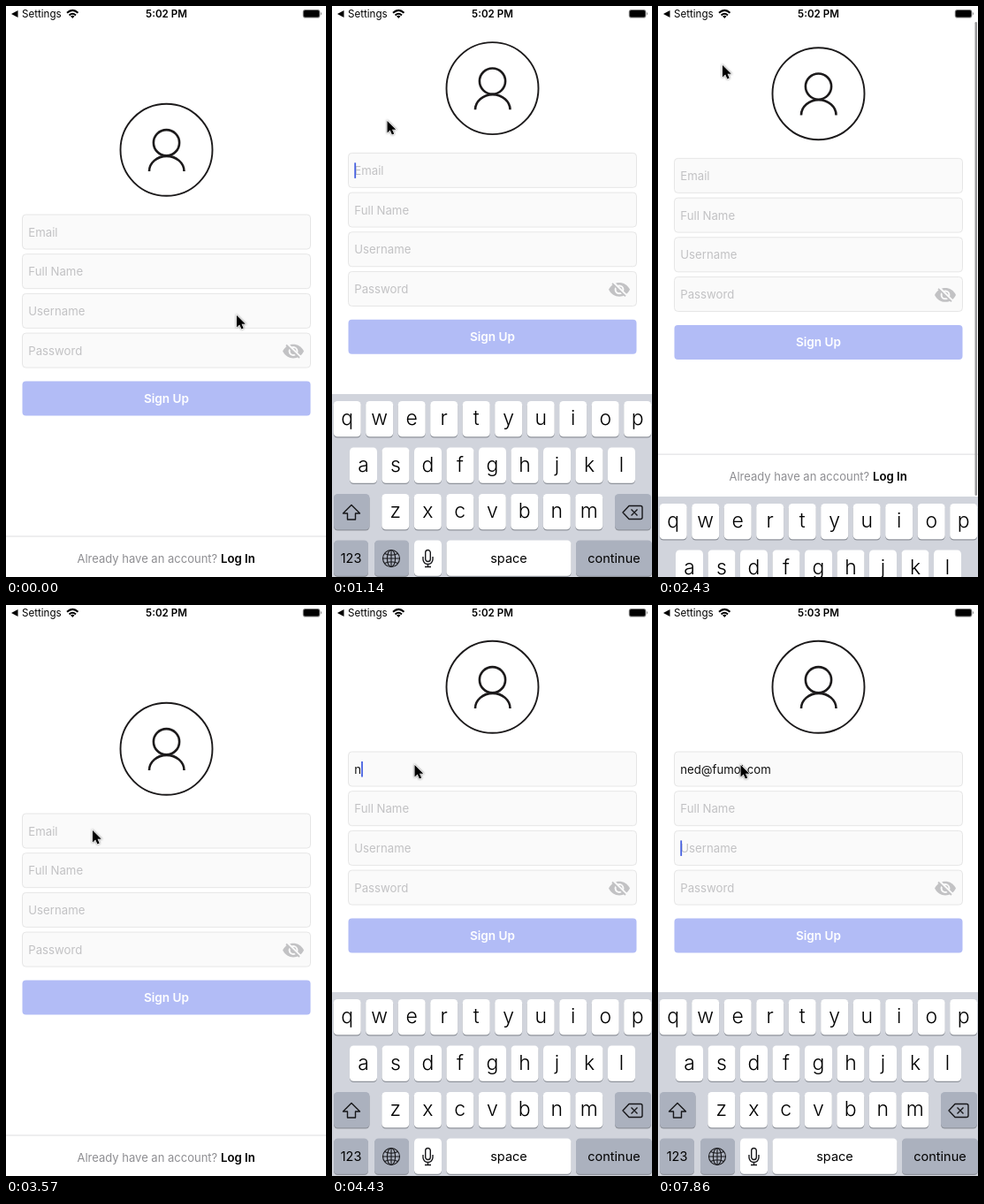
Animation, 362 px wide and 646 px high, one loop 8 s. Source, as an HTML page:

```html
<!DOCTYPE html>
<html lang="en">
<head>
<meta charset="utf-8">
<title>Sign up form</title>
<style>
  html, body { margin: 0; width: 100%; height: 100%; overflow: hidden; background: #fff; }
  svg { display: block; width: 362px; height: 646px; }
  text { font: 13.2px Inter, Roboto, sans-serif; }
  .bold { font-weight: 600; }
  .middle { text-anchor: middle; }
  .field { fill: #fafafa; stroke: #e6e6e6; }
  .hint { fill: #c2c2c4; }
  .line { fill: none; stroke: #17171a; stroke-width: 1.4; stroke-linejoin: round; }
  .letter { font-size: 23px; font-weight: 300; }
  .label { font-size: 14.5px; }
</style>
</head>
<body>
<svg viewBox="0 0 362 646">
  <g id="footer">
    <path d="M0 600H362" stroke="#e8e8ea" stroke-width="1.6"/>
    <text x="80.5" y="630" fill="#8e8e92" style="font-size:13px">Already have an account?</text>
    <text x="243" y="630" class="bold">Log In</text>
  </g>

  <g id="form">
    <g fill="none" stroke="#1c1a1b">
      <circle cx="181.5" cy="162.8" r="52" stroke-width="1.9"/>
      <circle cx="181.5" cy="154.7" r="14.6" stroke-width="2.6"/>
      <path d="M162 187A19.6 17 0 0 1 201.5 187" stroke-width="2.6"/>
    </g>
    <g id="fields"></g>
    <g transform="translate(325 390.5)">
      <path d="M-12 0C-7-10.500 7-10.500 12 0C7 10.500-7 10.500-12 0Z" fill="#c2c2c4"/>
      <circle r="5.4" fill="#fafafa"/>
      <circle r="3.4" fill="#c2c2c4"/>
      <path d="M-6-7.500L8 6.500" stroke="#fafafa" stroke-width="2.5"/>
      <path d="M-8-7L7 7.500" stroke="#c2c2c4" stroke-width="1.8"/>
    </g>
    <rect x="18.5" y="424.5" width="326" height="39" rx="4" fill="#b2bcf6"/>
    <text x="181.5" y="449" class="bold middle" fill="#fff" style="font-size:13.6px">Sign Up</text>
    <rect id="caret" width="1.8" height="17.5" fill="#4660e0"/>
  </g>

  <rect id="scrollbar" x="358.5" y="18" width="2.5" rx="1.2" fill="#969698"/>

  <g id="keyboard">
    <rect y="438" width="362" height="210" fill="#d1d4dc"/>
    <g id="keys"></g>
    <path class="line" d="M22 563.5L31.5 573H26.5V580H17.5V573H12.5Z"/>
    <path class="line" d="M329 572L336 564.5H349Q351 564.5 351 566.5V577.5Q351 579.5 349 579.5H336ZM338.5 568.5L345.5 575.5M345.5 568.5L338.5 575.5"/>
    <g class="line" transform="translate(67 624)" style="stroke-width:1.1">
      <circle r="9.5"/>
      <ellipse rx="4.6" ry="9.5"/>
      <path d="M0-9.5V9.5M-9.5 0H9.5M-7.5-5.5Q0-2 7.5-5.5M-7.5 5.5Q0 2 7.5 5.5"/>
    </g>
    <g class="line" transform="translate(108.5 624)">
      <rect x="-2.8" y="-9.5" width="5.6" height="13" rx="2.8"/>
      <path d="M-5.5-2V1A5.5 5.5 0 0 0 5.5 1V-2M0 6.5V9.5M-3.5 9.5H3.5"/>
    </g>
  </g>

  <g id="status">
    <path d="M6 9L13.5 5V13Z"/>
    <text x="18" y="13.2" style="font-size:11.6px">Settings</text>
    <path d="M69 7.7Q75.3 2 81.5 7.7M71.5 10.4Q75.3 7 79 10.4" fill="none" stroke="#000" stroke-width="2"/>
    <path d="M75.3 14L73 11.5Q75.3 9.8 77.6 11.5Z"/>
    <text id="clock" x="181.5" y="13.2" class="bold middle" style="font-size:11.6px"></text>
    <rect x="335.8" y="4" width="19.5" height="9.6" rx="2.8" fill="#777"/>
    <rect x="336.8" y="5" width="17.5" height="7.6" rx="1.8"/>
    <path d="M356 7Q358 8.7 356 10.5Z" fill="#8a8a8a"/>
  </g>

  <path id="pointer" d="M0 0V13.5L3.2 10.6L5.4 15.6L7.7 14.6L5.5 9.7H9.8Z" stroke="#fff" stroke-width="1.2" paint-order="stroke"
    style="filter:drop-shadow(0 .5px .8px #0008)"/>
</svg>
<script>
const DURATION = 8000;
const $ = id => document.getElementById(id);

const fieldY = i => 236 + i * 44.7;
$('fields').innerHTML = ['Email', 'Full Name', 'Username', 'Password'].map((hint, i) => `
  <rect class="field" x="18.5" y="${fieldY(i)}" width="326" height="39" rx="4"/>
  <text class="hint" x="25.3" y="${fieldY(i) + 24.5}">${hint}</text>`).join('');
const emailText = document.querySelector('.hint');

function key(x, y, width, label = '', kind = 'label', fill = '#fff') {
  const baseline = y + (kind === 'letter' ? 27 : 25);
  return `<rect x="${x}" y="${y + 1}" width="${width}" height="40.5" rx="4.5" fill="#8f939b"/>
    <rect x="${x}" y="${y}" width="${width}" height="40.3" rx="4.5" fill="${fill}"/>
    <text x="${x + width / 2}" y="${baseline}" class="middle ${kind}">${label}</text>`;
}
const letterRow = (letters, x, y) =>
  [...letters].map((c, i) => key(x + i * 36.5, y, 31, c, 'letter')).join('');
const GREY = '#abb1be';
$('keys').innerHTML =
  letterRow('qwertyuiop', 1.7, 446) + letterRow('asdfghjkl', 20, 498.5) + letterRow('zxcvbnm', 56.3, 551) +
  key(2, 551, 40.5, '', 'label', GREY) + key(320, 551, 41, '', 'label', GREY) +
  key(2, 603.5, 39, '123', 'label', GREY) + key(48, 603.5, 39, '', 'label', GREY) +
  key(93, 603.5, 31) + key(129.5, 603.5, 141, 'space') + key(276, 603.5, 86, 'continue', 'label', GREY);

const EMAIL = 'ned@fumol.com';
const KEY_TIMES = [4400, 4570, 4850, 5290, 5570, 6000, 6140, 6280, 6430, 6710, 6850, 6920, 6990];
const SHOW = 705, HIDE = 2320, SHOW_AGAIN = 3645;

// time, x, y
const POINTER = [
  [40, 261, 350], [430, 100, 252], [640, 100, 252], [1140, 62.5, 130], [1750, 66, 62],
  [2290, 72, 48], [2430, 73, 67], [2860, 80, 150], [3430, 98, 255], [3640, 98, 255], [4100, 93.5, 181]
];

const smooth = (t, from, to) => {
  const p = Math.min(1, Math.max(0, (t - from) / (to - from)));
  return p * p * (3 - 2 * p);
};
const spring = elapsed => {
  const p = Math.max(0, elapsed) * 0.017;
  return 1 - (1 + p) * Math.exp(-p);
};

function pointerAt(t) {
  let [, x, y] = POINTER[0];
  for (let i = 1; i < POINTER.length; i++) {
    const [start, x0, y0] = POINTER[i - 1], [end, x1, y1] = POINTER[i];
    const p = smooth(t, start, end);
    x += (x1 - x0) * p;
    y += (y1 - y0) * p;
  }
  return [x, y];
}

function draw(t) {
  const hiding = t >= HIDE && t < SHOW_AGAIN;
  const focused = t >= SHOW && !hiding;
  const shown = hiding ? 1 - spring(t - HIDE) : spring(t - (t < HIDE ? SHOW : SHOW_AGAIN));
  const lift = hiding ? 1 - smooth(t, 2335, 2850) : shown;
  const slide = (id, y) => $(id).setAttribute('transform', `translate(0 ${y})`);
  slide('keyboard', 208 * (1 - shown));
  slide('form', -70 * lift);
  slide('footer', -212 * shown);
  $('footer').style.display = focused ? 'none' : '';

  $('scrollbar').setAttribute('height', 627 - 208 * shown);
  $('scrollbar').style.opacity = smooth(t, 2250, 2330) * (1 - smooth(t, 2900, 3250));

  const typed = KEY_TIMES.filter(time => time <= t).length;
  emailText.textContent = EMAIL.slice(0, typed) || 'Email';
  emailText.style.fill = typed ? '#111' : '';

  const active = t < 7290 ? 0 : t < 7700 ? 1 : 2;
  const lastAction = Math.max(...[SHOW, SHOW_AGAIN, ...KEY_TIMES, 7290, 7700].filter(time => time <= t));
  $('caret').style.display = focused && (t - lastAction) % 1000 < 600 ? '' : 'none';
  $('caret').setAttribute('x', 25.3 + (typed && !active ? emailText.getComputedTextLength() : 0));
  $('caret').setAttribute('y', fieldY(active) + 11);

  $('clock').textContent = t < 4850 ? '5:02 PM' : '5:03 PM';
  $('pointer').setAttribute('transform', `translate(${pointerAt(t)})`);
}

function frame() {
  draw(performance.now() % DURATION);
  requestAnimationFrame(frame);
}
frame();
</script>
</body>
</html>
```
